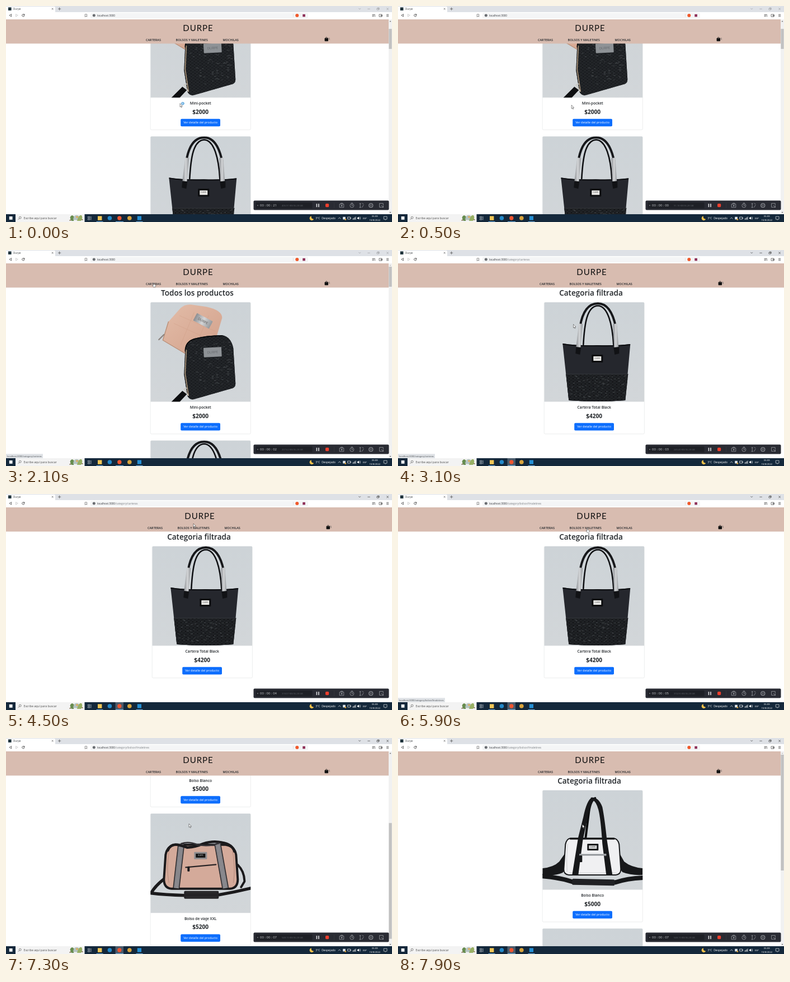
An HTML page for the animation above (8 s loop, 690 px wide and 388 px high).

```html
<!DOCTYPE html>
<html lang="es">
<head>
<meta charset="utf-8">
<title>Durpe</title>
<style>
html, body { margin: 0; width: 100%; height: 100%; overflow: hidden; background: #fff; }
svg { display: block; }
text { font-family: "Open Sans", "Noto Sans", sans-serif; white-space: pre; }
.logo { font-family: Lato, sans-serif; font-weight: 400; letter-spacing: 1px; }
.line { fill: none; stroke-linecap: round; stroke-linejoin: round; }
.flat { stroke-linecap: butt; }
</style>
</head>
<body>
<svg id="stage" width="690" height="388" viewBox="0 0 690 388"></svg>
<script>
const LOOP = 8000, STEP = 100;
const BRAND = 'DURPE';
const stage = document.getElementById('stage');

// Drawing helpers; text is placed by the middle of its capitals
const rect = (x, y, w, h, fill, extra = '') =>
  `<rect x="${x}" y="${y}" width="${w}" height="${h}" fill="${fill}" ${extra}/>`;
const disc = (x, y, r, fill, extra = '') => `<circle cx="${x}" cy="${y}" r="${r}" fill="${fill}" ${extra}/>`;
const shape = (d, fill, extra = '') => `<path d="${d}" fill="${fill}" ${extra}/>`;
const line = (d, color, width = 0.7, extra = '', kind = 'line') =>
  `<path class="${kind}" d="${d}" stroke="${color}" stroke-width="${width}" ${extra}/>`;
const flatLine = (d, color, width, extra = '') => line(d, color, width, extra, 'line flat');
const text = (x, y, s, size, fill, extra = '') =>
  `<text x="${x}" y="${y + size * 0.36}" font-size="${size}" fill="${fill}" ${extra}>${s}</text>`;
const MID = 'text-anchor="middle"';

function random(seed) {
  return () => (seed = (seed * 16807) % 2147483647) / 2147483647;
}

function glints(count, x, y, w, h, seed) {
  const rnd = random(seed);
  let d = '';
  for (let i = 0; i < count; i++) {
    const px = x + rnd() * w, py = y + rnd() * h;
    d += `M${px.toFixed(1)} ${py.toFixed(1)}l${(1 + rnd() * 3).toFixed(1)} ${(rnd() - 0.5).toFixed(1)}`;
  }
  return line(d, '#8b9095', 0.6, 'opacity=".55"');
}

const plate = (x, y, w, h, outer, inner, ink) =>
  rect(x, y, w, h, outer, 'rx="1"') + rect(x + 3, y + 3, w - 6, h - 6, inner) +
  text(x + w / 2, y + h / 2, BRAND, 3, ink, MID);

const defs = `<defs>
  <pattern id="croc" width="7" height="5.4" patternUnits="userSpaceOnUse" patternTransform="rotate(-4)">
    <rect x=".5" y=".5" width="6" height="4.4" rx="1.6" fill="#1e2124" stroke="#393d41" stroke-width=".5"/>
  </pattern>
  <linearGradient id="silver" x2="1"><stop stop-color="#8b8e92"/><stop offset=".5" stop-color="#d3d5d7"/><stop offset="1" stop-color="#96999c"/></linearGradient>
  <linearGradient id="photo" x2="0" y2="1"><stop stop-color="#cdd3d7"/><stop offset="1" stop-color="#d2d6d9"/></linearGradient>
  <linearGradient id="pink" x2="1" y2="1"><stop stop-color="#e3bda9"/><stop offset="1" stop-color="#d2a08a"/></linearGradient>
  <clipPath id="view"><rect y="24" width="690" height="350"/></clipPath>
</defs>`;

function purses() {
  const front = 'M62 86Q62 70 78 65Q100 59 128 59Q144 62 148 82L152 146Q152 154 144 155L78 174Q70 176 66 168L60 130Z';
  return shape('M32 35L54 10Q62 3 72 4L100 8Q128 14 128 28L118 62L62 92L22 68Z', 'url(#pink)') +
    line('M32 35L22 68L62 92', '#b98f78', 1.4) +
    line('M42 38L104 66M52 24L116 52M54 76L78 18M78 84L104 24', '#c9987f', 0.6, 'opacity=".6"') +
    line('M15 67L24 58', '#8d8580', 2.4) +
    `<g transform="rotate(28 94 33)">${rect(78, 26, 32, 15, 'url(#silver)', 'rx="1"')}${text(94, 33.5, BRAND, 6, '#55514e', MID)}</g>` +
    shape('M37 179L57 159L65 165L52 179Z', '#0d0e10') +
    shape(front, '#121417') + shape(front, 'url(#croc)', 'opacity=".85"') +
    glints(75, 70, 70, 74, 85, 71) +
    line('M64 86L62 128L68 168', '#b0987c', 1.8, 'stroke-dasharray="1 1.6"') +
    line('M62 88Q62 71 78 66Q100 60 128 60', '#050607', 1.6) +
    line('M62 158L67 167M60 156L65 154', '#c7c3bc', 1.8) +
    `<g transform="rotate(-3 111 89)">${rect(95, 81, 32, 17, '#8e9296', 'rx="1"')}${text(111, 89.5, BRAND, 6, '#64686c', MID)}</g>`;
}

function tote() {
  const base = 'M39 129L150 129L145 176Q95 180 44 176Z';
  return line('M70 76C72 40 76 7 96 6C114 7 122 40 124 76', '#0f1013', 2.6) +
    line('M64 44C68 20 77 2 96 2C113 2 123 20 128 44', '#17181b', 4) +
    shape('M33 74Q60 78 95 77Q130 78 154 75L145 176Q95 180 44 176Z', '#25272d') +
    line('M34 75Q60 79 95 78Q130 79 153 76', '#0d0e11', 1.8) +
    shape(base, '#0e0f11') + shape(base, 'url(#croc)', 'opacity=".8"') + glints(70, 46, 132, 97, 40, 29) +
    line('M39 129H150', '#3b3d42', 0.8) +
    shape('M62 38L69 39L65 82L57 81Z', 'url(#silver)') + shape('M123 39L130 38L133 81L125 82Z', 'url(#silver)') +
    shape('M57 80L66 81L64 94L56 92Z', '#111215') + shape('M124 81L134 80L134 92L126 94Z', '#111215') +
    plate(85, 94, 20, 14, '#0b0c0e', '#ecebe8', '#444');
}

function whiteBag() {
  const black = '#17181a';
  return shape('M41 112L30 128Q20 138 0 140V152Q22 154 36 148Q44 140 43 124Z', black) +
    shape('M137 112L146 128Q158 138 179 140V152Q158 153 143 147Q136 140 136 124Z', black) +
    flatLine('M-2 154Q28 156 56 165M128 166Q152 158 181 157', black, 8) +
    line('M77 86L83 38Q86 18 94 14', '#0c0d0e', 4) +
    shape('M50 86H127Q135 87 137 97L140 142Q140 151 131 152H47Q38 151 38 142L41 97Q43 87 50 86Z', '#f0f0f2', `stroke="${black}" stroke-width="2"`) +
    line('M45 96Q42 122 44 146M48 148.5H132', '#c5c7ca', 0.8) +
    shape('M53 152L64 84L73 48Q79 18 88 13L95 14Q84 26 80 52L72 90L64 152Z', black) +
    shape('M86 13Q100 11 107 30Q111 50 115 88L125 152H114L107 96Q104 50 100 35Q96 20 90 18Z', black) +
    line('M50 87H128', black, 3) +
    rect(66, 114, 48, 3.6, '#b9bcc0') + line('M67 116H113', '#55585c', 0.8) +
    rect(66, 117, 5, 12, black, 'rx="1"') +
    plate(80, 96, 20, 12, black, '#d8d9da', '#333') +
    rect(53, 159.5, 76, 11, '#202124', 'rx="2" transform="rotate(1 91 165)"');
}

function travelBag() {
  const black = '#1b1a1c';
  const band = (d) => flatLine(d, '#29282b', 12) + flatLine(d, '#828186', 9) +
    flatLine(d, '#b4b3b6', 5, 'stroke-dasharray=".6 1.4" opacity=".5"');
  return line('M26 116Q8 130 1 143Q26 146 62 147M122 146Q150 141 179 134', black, 5.5) +
    line('M156 92Q168 104 168 122L162 132', black, 4) +
    shape('M44 56H134Q150 58 153 74L156 118Q156 134 142 135H38Q24 134 24 118L27 74Q30 58 44 56Z', '#d4aa9a', `stroke="${black}" stroke-width="4"`) +
    line('M33 68Q28 100 33 124M147 68Q152 100 148 124', '#b98f80', 1.2) +
    band('M55 55L46 134') + band('M120 55L134 134') +
    line('M31 66Q36 54 48 56Q58 58 66 61Q82 60 94 54Q112 48 128 52Q146 55 150 68', black, 4.5) +
    line('M55 54Q68 49 84 56Q106 60 122 53', '#343236', 2.6) +
    plate(78, 69, 23, 13, '#8e8d90', '#111', '#ddd') +
    line('M63 96.5L117 91.5', '#292426', 2.2) + rect(66, 95, 4, 9, black, 'rx="1"') +
    rect(60, 139, 62, 14, '#242326', 'rx="2"') + line('M64 142H118M64 150H118', '#3f3e42', 0.6);
}

const card = (index, name, price, art) => `<g transform="translate(258 ${94 + index * 248.3})">
  ${rect(0.2, 0.2, 179.2, 236.2, '#fff', 'rx="2" stroke="#d9dadb" stroke-width=".5"')}
  <svg x=".3" width="179" height="178.5">${rect(0, 0, 179, 182, 'url(#photo)', 'rx="2"')}${art}</svg>
  ${text(89.7, 189, name, 6.65, '#212529', MID + ' font-weight="600"')}
  ${text(89.7, 204, price, 10.1, '#212529', MID + ' font-weight="700"')}
  ${rect(54.2, 216.8, 70.8, 13.5, '#0d6efd', 'rx="2"')}
  ${text(89.6, 223.5, 'Ver detalle del producto', 5.45, '#fff', MID)}</g>`;

const page = (id, title, cards) => `<g id="${id}"><g>
  ${text(342, 77, title, 13.5, '#212529', MID + ' font-weight="600"')}${cards}</g></g>`;

const pages = page('all', 'Todos los productos',
    card(0, 'Mini-pocket', '$2000', purses()) + card(1, 'Cartera Total Black', '$4200', tote())) +
  page('purse', 'Categoria filtrada', card(0, 'Cartera Total Black', '$4200', tote())) +
  page('bags', 'Categoria filtrada',
    card(0, 'Bolso Blanco', '$5000', whiteBag()) + card(1, 'Bolso de viaje XXL', '$5200', travelBag()));

const navItem = (x, s) => text(x, 61.3, s, 5.5, '#212529', 'font-weight="600"');
const header = rect(0, 24, 690, 43.5, '#d8bcb0') + `<g id="header">
  ${text(343.5, 39.5, BRAND, 15, '#111', MID + ' class="logo"')}
  ${navItem(250, 'CARTERAS')}${navItem(303.5, 'BOLSOS Y MALETINES')}${navItem(387.5, 'MOCHILAS')}
  ${rect(569.6, 57.8, 6.4, 5.4, '#111', 'rx=".8"')}${line('M571.2 58V57Q572.8 55 574.4 57V58', '#111', 0.8)}
  ${text(576.2, 59, '5', 4.8, '#444')}</g>`;

const scrollbar = `<g id="bar">${rect(684, 24, 6, 350, '#f1f1f1')}
  <rect id="thumb" x="684.4" width="5.2" fill="#c1c1c1"/>
  <path id="up" d="M685.6 28.2L687 26.4L688.4 28.2Z"/>${shape('M685.6 370L687 371.8L688.4 370Z', '#505050')}</g>`;

const browser = rect(0, 0, 690, 24, '#fff') + rect(0, 0, 690, 11, '#dee1e6') +
  shape('M0 11V1H86Q88 1 88 3V11Z', '#fff') + rect(4, 2.4, 5.6, 5.6, '#20343c') +
  text(13, 5.4, 'Durpe', 4.5, '#3c4043') +
  line('M82 4L84.4 6.4M84.4 4L82 6.4', '#444', 0.6) + line('M93.4 5.2H97.8M95.6 3V7.4', '#444', 0.7) +
  `<g id="controls" class="line" stroke="#222" stroke-width=".6"><path d="M630.6 4.4L632.2 6L633.8 4.4M646.8 5.3H650.4M663.4 4.2H666.2V7H663.4ZM664.4 4.2V3.3H667.1V6H666.2M680.6 3.8L683.6 6.8M683.6 3.8L680.6 6.8"/></g>` +
  rect(151, 12.4, 389, 10, '#f4f5f6', 'rx="2"') +
  line('M9.6 14.9V19.1L6.2 17Z', '#333', 0.7) + line('M17.6 14.9V19.1L21 17Z', '#bbb', 0.7) +
  line('M32.7 15.5A2.2 2.2 0 1 0 33 17.6M33 14.6V16.2H31.4', '#333', 0.8) +
  line('M141.6 14.8H144.6V19.4L143.1 18.2L141.6 19.4Z', '#444', 0.6) +
  disc(157.3, 17, 2.4, '#4b4f54') + line('M157.3 16.8V18.3M157.3 15.6V15.7', '#fff', 0.6) +
  `<text x="163" y="18.8" font-size="4.75" fill="#303338">localhost:3000<tspan id="path" fill="#7b7f84"></tspan></text>` +
  line('M513.5 14.5V19.5', '#ccc', 0.5) + disc(520.3, 17, 3, '#f0592b') + rect(530.3, 14.8, 4.6, 4.6, '#8e2f58') +
  line('M655 15.4H659.6M655 17H658M655 18.6H657.4M659.6 17V19', '#444', 0.7) +
  line('M667.4 15H672V19.2H667.4ZM670.4 16.6H672.6V18H670.4Z', '#444', 0.7) +
  line('M680.4 15.2H683.8M680.4 17H683.8M680.4 18.8H683.8', '#444', 0.7);

const status = `<g id="status"><rect id="statusBox" y="366.3" height="7.7" fill="#dfe2e6"/>
  <text id="statusText" x="2" y="371.7" font-size="4.07" fill="#4c5054"></text></g>`;

const taskbar = rect(0, 374, 690, 14, '#14283b') + rect(5.8, 378, 5.8, 5.8, '#f2f6f9') +
  rect(17, 374, 123.5, 14, '#f3f3f3') +
  disc(25.2, 380.2, 1.9, 'none', 'stroke="#444" stroke-width=".6"') + line('M23.8 381.7L22 383.5', '#444', 0.7) +
  text(31.5, 381, 'Escribe aquí para buscar', 5.2, '#4a4a4a') +
  line('M114 385Q124 380 137 384', '#7b6247', 1.4) +
  shape('M117 386Q112 378 118 376Q124 377 121 386Z', '#678c4f') +
  shape('M120 384Q121 374 128 376Q134 378 129 385Z', '#b5c4c2') +
  shape('M127 386Q130 374 135 376Q138 380 134 386Z', '#98b064') + disc(127, 379, 1.8, '#e2ad55') +
  line('M146.8 378.3H150V380.4H146.8ZM146.8 382H150V384H146.8ZM152 378.3V384', '#e8edf2', 0.6) +
  rect(195.5, 374, 14.5, 14, '#4a5b6b', 'id="active"') +
  rect(164, 377.4, 7.4, 7.4, '#f2c656') + disc(185.4, 381, 3.8, '#2389ca') + disc(202.8, 381, 3.7, '#ef5530') +
  disc(220.8, 381, 3.8, '#d9a33b') + rect(234.8, 377.4, 7.2, 7.2, '#248fd5') +
  rect(161.5, 387, 12, 1, '#76b9ed') + rect(196, 387, 14, 1, '#76b9ed') + rect(232.5, 387, 12, 1, '#76b9ed') +
  shape('M546 377.2A4 4 0 1 0 550.4 382.6A4 4 0 0 1 546 377.2Z', '#f3c14b') +
  text(553.3, 381, '3°C', 5, '#fff') + text(564.2, 381, 'Despejado', 5, '#fff') +
  line('M594.2 382L596.2 380L598.2 382', '#fff', 0.7) +
  rect(602.2, 378.8, 4.6, 4.6, '#dfe5ea') + disc(606.8, 383.4, 1.4, '#e0a438') +
  line('M611 379.2H615.6V382.8H611ZM616.4 380.4V381.8', '#fff', 0.7) +
  line('M620.2 383.4V382M621.8 383.4V381M623.4 383.4V380M625 383.4V379', '#fff', 0.8) +
  shape('M628 380H629.3L631 378.6V383.6L629.3 382.2H628Z', '#fff') +
  line('M632 379.6Q633.2 381 632 382.6M633.2 378.8Q635 381 633.2 383.4', '#fff', 0.5) +
  text(641.3, 381, 'ESP', 4.2, '#fff', MID) +
  text(659.3, 377.8, '06:08', 4.2, '#fff', MID) + text(659.3, 384, '10/8/2022', 4.2, '#fff', MID) +
  line('M675.6 378.2H681V383H679.4L678.2 384.4V383H675.6Z', '#fff', 0.6);

const icon = (d) => line(d, '#9b9ea4', 0.8);
const recorder = rect(442.5, 349.5, 242, 17, '#292b33', 'rx="2"') + rect(446.5, 352.8, 101, 10.6, '#1e2026', 'rx="1"') +
  disc(450, 358.2, 1, '#777', 'id="dot"') +
  `<text id="clock" x="454" y="360.4" font-size="6" fill="#c8cacd"></text>
  <text id="size" x="493" y="359.8" font-size="4.1" fill="#5e6168"></text>` +
  rect(554.6, 355.2, 1.7, 6, '#d6d8da') + rect(558.2, 355.2, 1.7, 6, '#d6d8da') +
  rect(571, 355, 6.2, 6.2, '#ee3f2d', 'rx="1.6"') + line('M586.5 354V362.5', '#3c3f45', 0.5) +
  icon('M596.6 355.8H603.8V361.8H596.6ZM598.6 355.6V354.2H601.8V355.6') + disc(600.2, 358.8, 1.3, '#9b9ea4') +
  disc(618.4, 358.5, 3.5, 'none', 'stroke="#9b9ea4" stroke-width=".8"') + icon('M618.4 356.6V358.6H620M617.2 354H619.6') +
  icon('M632 355H634.4M633.2 355V361.8M636.4 361.6L639 357.8M637 354.6L639 355.8M632 361.8H634.4') +
  disc(652.3, 358.2, 3.5, 'none', 'stroke="#9b9ea4" stroke-width="1.1"') + disc(652.3, 358.2, 1.3, 'none', 'stroke="#9b9ea4" stroke-width=".7"') +
  icon('M674.2 358V354.6H667.6V361.4H671M671 358L674.4 361.6M674.4 359.2V361.6H672');

const pointer = `<g id="pointer">
  <g id="arrow">${shape('M0 0V6.4L1.5 5.1L2.5 7.4L3.5 7L2.5 4.7H4.5Z', '#fff', 'stroke="#222" stroke-width=".5"')}</g>
  <g id="hand">${shape('M-.7 .6Q0-.5 .7 .6V3L3 3.5Q4 3.8 3.8 5L3.2 7.5H-.6L-2.4 4.6Q-2 3.6-.7 4.8Z', '#fff', 'stroke="#222" stroke-width=".5"')}</g>
  ${disc(5, 0, 2, '#d9effc', 'id="busy" stroke="#2586d0" stroke-width="1.2"')}</g>`;

stage.innerHTML = defs + rect(0, 0, 690, 388, '#fff') + `<g clip-path="url(#view)">${pages}</g>` +
  header + scrollbar + browser + status + taskbar + recorder + pointer;

const el = {};
stage.querySelectorAll('[id]').forEach((node) => { el[node.id] = node; });
const show = (node, on) => node.setAttribute('display', on ? 'inline' : 'none');
const move = (node, x, y) => node.setAttribute('transform', `translate(${x} ${y})`);
const within = (t, a, b) => t >= a && t < b;

// Each key is [time, ...values]
function track(keys, t, ease = (u) => u) {
  const next = keys.findIndex((key) => key[0] > t);
  if (next < 0) return keys[keys.length - 1].slice(1);
  if (next === 0) return keys[0].slice(1);
  const a = keys[next - 1], b = keys[next];
  const u = ease((t - a[0]) / (b[0] - a[0]));
  return a.slice(1).map((v, i) => v + (b[i + 1] - v) * u);
}
const smooth = (u) => u * u * (3 - 2 * u);

const SCROLL_ALL = [[0, 108], [700, 108], [900, 29], [1000, 4.3], [1100, 0]];
const SCROLL_BAGS = [[6300, 0], [6500, 18], [6800, 88.3], [7100, 206.5], [7300, 206.5], [7500, 110], [7700, 14], [7800, 0]];
const POINTER = [[0, 311, 175], [900, 309.5, 180], [1200, 309.5, 180], [1900, 264, 59], [2500, 264, 59],
  [3000, 313.5, 133.5], [4000, 313.5, 133.5], [4500, 335, 53], [4900, 338, 60], [5200, 338.5, 61.5],
  [6000, 338.5, 61.5], [6400, 327, 152], [7300, 327, 154], [7900, 329.5, 155]];
const SIZES = [91.18, 164.23, 207.62, 245.4, 318.07, 374.95, 480.85, 548.15];
const CARTERAS = '/category/carteras', BOLSOS = '/category/bolsosYmaletines';

function draw(t) {
  const current = t < 2400 ? 'all' : t < 6000 ? 'purse' : 'bags';
  const scrolls = current !== 'purse';
  const shift = scrolls ? 0 : 3;
  const [top] = current === 'all' ? track(SCROLL_ALL, t) : current === 'bags' ? track(SCROLL_BAGS, t) : [0];
  for (const id of ['all', 'purse', 'bags']) show(el[id], id === current);
  move(el[current].firstElementChild, shift, -top);
  move(el.header, shift, 0);

  const length = current === 'all' ? 36 : 208;
  show(el.bar, scrolls);
  el.thumb.setAttribute('y', 30 + top * length / 350);
  el.thumb.setAttribute('height', length);
  el.up.setAttribute('fill', top > 0 ? '#505050' : '#b5b5b5');

  const focused = t >= 2200;
  el.controls.setAttribute('opacity', focused ? 1 : 0.4);
  show(el.active, focused);
  el.path.textContent = t < 2300 ? '' : t < 5900 ? CARTERAS : BOLSOS;

  const link = within(t, 1900, 3300) ? CARTERAS : within(t, 4900, 7000) ? BOLSOS : '';
  show(el.status, link);
  el.statusText.textContent = 'localhost:3000' + link;
  el.statusBox.setAttribute('width', link === CARTERAS ? 66 : 84);

  const starting = t < 500;
  const sec = Math.max(0, Math.floor((t - 50) / 1000));
  el.clock.textContent = '00 : 00 : ' + (starting ? '21' : '0' + sec);
  el.size.textContent = (starting ? '406.91' : SIZES[sec].toFixed(2)) + ' KB/36.28 GB';
  el.dot.setAttribute('fill', within(t % 2900, 900, 1150) ? '#ff3b2f' : '#74777c');

  const [x, y] = track(POINTER, t, smooth);
  const onLink = within(t, 1900, 2600) || within(t, 4800, 6100);
  move(el.pointer, x, y);
  show(el.hand, onLink);
  show(el.arrow, !onLink);
  show(el.busy, starting);
}

const start = performance.now();
function tick() {
  const t = (performance.now() - start) % LOOP;
  draw(Math.floor(t / STEP) * STEP);
  requestAnimationFrame(tick);
}
draw(0);
requestAnimationFrame(tick);
</script>
</body>
</html>
```
